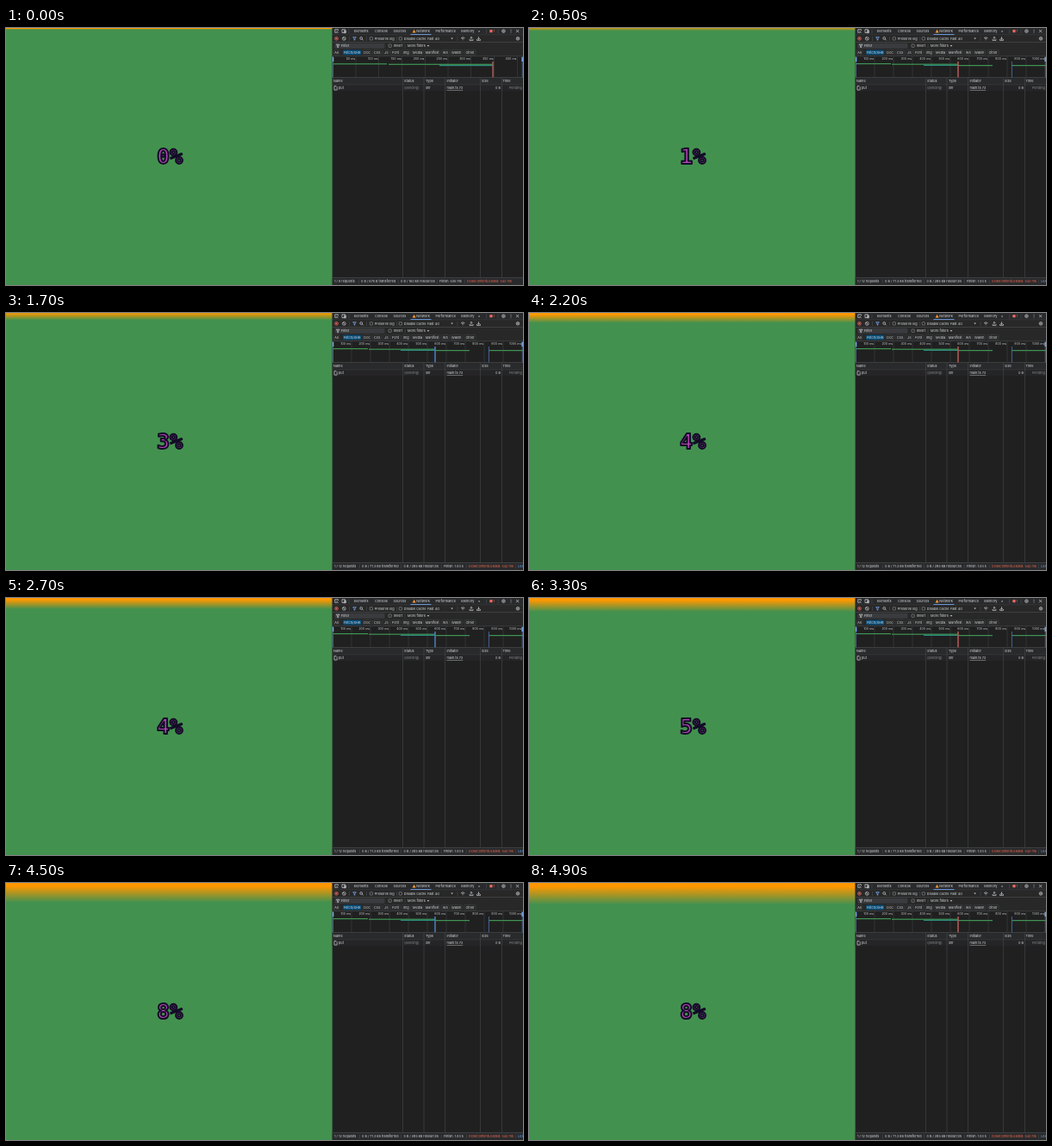
These frames come from a looping animation (600 by 299 pixels, 5 s). An HTML page:

```html
<!DOCTYPE html>
<html lang="en">
<head>
<meta charset="utf-8">
<title>Upload progress</title>
<style>
  html, body { margin: 0; width: 100%; height: 100%; overflow: hidden; background: #202020; }
  svg { display: block; width: 100vw; height: 100vh; }
  .ui { font: 3.85px Inter, Roboto, sans-serif; fill: #d6d8da; }
  .dim { fill: #85888b; }
  .strong { font-weight: 600; }
  .end { text-anchor: end; }
  .mid { text-anchor: middle; }
  .tick { font-size: 3.6px; fill: #c0c2c4; }
  .foot { font-size: 3.75px; }
  .alert { fill: #ef6a50; }
  .load { fill: #6ea8f5; }
  .link { text-decoration: underline; }
  .icon { fill: none; stroke: #c4c6c8; stroke-width: .75; }
  #percent {
    font: bold 25px "DejaVu Sans Mono", monospace; text-anchor: middle;
    fill: #b546b4; stroke: #120c26; stroke-width: 2; stroke-linejoin: round;
  }
</style>
</head>
<body>
<svg viewBox="0 0 600 299" preserveAspectRatio="none">
  <defs>
    <linearGradient id="fade" x2="0" y2="1">
      <stop offset=".15" stop-color="#ff9800"/>
      <stop offset="1" stop-color="#ff9800" stop-opacity="0"/>
    </linearGradient>
    <clipPath id="panelClip"><rect x="378.5" width="221.5" height="299"/></clipPath>
  </defs>
  <rect width="379" height="299" fill="#43914f"/>
  <rect id="glow" width="379" height="1"/>
  <text id="percent" x="190" y="158.4">0%</text>
  <g clip-path="url(#panelClip)">
    <g id="panel"></g>
    <g id="early"></g>
    <g id="late"></g>
  </g>
</svg>
<script>
const LOOP = 5000, FRAME = 100, EASE_TIME = 600, SWITCH = 300;
const updates = [
  [0, 1.08], [800, 2.17], [1500, 3.25], [2000, 4.33],
  [2800, 5.42], [3400, 6.52], [4000, 7.6], [4600, 8.67]
];

const byId = id => document.getElementById(id);
const rect = (x, y, w, h, fill, extra = '') =>
  `<rect x="${x}" y="${y}" width="${w}" height="${h}" fill="${fill}" ${extra}/>`;
const text = (x, y, label, cls = '') => `<text class="ui ${cls}" x="${x}" y="${y}">${label}</text>`;
const icon = (d, color = '#c4c6c8') => `<path class="icon" d="${d}" style="stroke:${color}"/>`;
const ring = (x, y, r, color = '#c4c6c8') =>
  `<circle class="icon" cx="${x}" cy="${y}" r="${r}" style="stroke:${color}"/>`;
const box = (x, y) => rect(x, y, 3.3, 3.3, 'none', 'rx=".5" stroke="#a4a6a8" stroke-width=".5"');
const vline = (x, y, h, color = '#4b4d50', w = .6) => rect(x - w / 2, y, w, h, color);
const hline = y => rect(378.5, y, 221.5, .6, '#4b4d50');
const gear = (x, y) => ring(x, y, 1.8) + ring(x, y, .6);
const arrow = (x, y) => `<path d="M${x - 1.3} ${y - .7}h2.6l-1.3 1.6z" fill="#c4c6c8"/>`;
const funnel = (x, y, color) => icon(`M${x - 1.8} ${y - 1.6}h3.6l-1.4 1.8v1.6h-.8v-1.6z`, color);

function drawTabs() {
  const tabs = [[404, 'Elements'], [428, 'Console'], [449.5, 'Sources'],
    [476.3, 'Network'], [498.5, 'Performance'], [528.3, 'Memory']];
  return rect(378.5, 0, 221.5, 8, '#292a2c') + hline(7.8)
    + icon('M384.5 5.3h-2.7v-3.6h3.6v1.6M383.6 3.5l2 2')
    + icon('M390 1.7h3.6v3.8h-3.6zM392.5 3h2v2.7h-2z') + vline(398, 1.5, 5)
    + tabs.map(([x, label]) => text(x, 5.2, label)).join('')
    + '<path d="M473.6 1.8l2 3.6h-4z" fill="#f29a35"/>'
    + rect(469.5, 7.2, 24, .9, '#7cacf8')
    + text(548, 5.1, '»') + vline(557.5, 1.5, 5)
    + rect(561.3, 2, 3.3, 3.3, '#e46962', 'rx=".6"') + text(565.6, 5.1, '1', 'alert')
    + vline(571, 1.5, 5) + gear(577.4, 3.6)
    + [2, 3.6, 5.2].map(y => rect(585.6, y - .4, .8, .8, '#c4c6c8')).join('')
    + icon('M592 2l3.2 3.2M595.2 2l-3.2 3.2');
}

function drawToolbar() {
  return rect(378.5, 8.4, 221.5, 24, '#282828')
    + ring(383.5, 12.3, 1.9, '#e46962') + rect(382.6, 11.4, 1.8, 1.8, '#e46962')
    + ring(392.3, 12.3, 1.9) + icon('M391 11l2.6 2.6') + vline(398.5, 10, 5)
    + funnel(404.5, 12.3, '#7cacf8') + ring(412.2, 11.9, 1.4) + icon('M413.3 13l1.4 1.4')
    + vline(418.5, 10, 5) + box(422.2, 10.7) + text(427.8, 13.7, 'Preserve log')
    + vline(453.8, 10, 5) + box(456.2, 10.7) + text(461.8, 13.7, 'Disable cache')
    + text(489, 13.7, 'Fast 4G') + arrow(517.6, 12.3) + vline(524, 10, 5)
    + icon('M528 11.7q2.2-1.9 4.4 0M529 12.9q1.2-1 2.4 0M530.2 13.8v.5')
    + icon('M540 13.5v-3.2l-1.3 1.3M540 10.3l1.3 1.3M538 13v1.4h4v-1.4')
    + icon('M548.5 10.2v3.2l-1.3-1.3M548.5 13.4l1.3-1.3M546.5 13v1.4h4v-1.4')
    + gear(594, 12.3) + hline(16)
    + rect(381.5, 17.7, 58, 6, '#3a3b3e', 'rx="1"') + funnel(385.2, 20.8)
    + text(389, 22.1, 'Filter') + box(444, 19) + text(449.8, 22.1, 'Invert')
    + vline(463, 18.5, 5) + text(466, 22.1, 'More filters') + arrow(490, 20.8);
}

function drawChips() {
  const chips = [[383.6, 'All', 6.6], [401.7, 'Fetch/XHR', 21], [419, 'Doc', 10],
    [430.7, 'CSS', 10], [441.3, 'JS', 8], [452, 'Font', 11.2], [464.3, 'Img', 9.5],
    [477.5, 'Media', 13.5], [494.6, 'Manifest', 18], [509.8, 'WS', 9],
    [522.7, 'Wasm', 13.8], [538.5, 'Other', 13.5]];
  return chips.map(([x, label, w], i) =>
    rect(x - w / 2, 25.4, w, 5.8, i === 1 ? '#064b77' : 'none',
      i === 1 ? 'rx="1.2"' : 'rx="1.2" stroke="#4b4d50" stroke-width=".4"')
    + text(x, 29.6, label, 'mid')).join('');
}

function drawTable() {
  const columns = [460.5, 485, 509.7, 550.5, 575.3];
  return rect(378.5, 57.5, 221.5, 8.6, '#292a2c') + hline(57.4) + hline(65.8)
    + rect(378.5, 66.4, 221.5, 7, '#252527')
    + columns.map(x => vline(x, 58, 232, '#47494c')).join('')
    + [[380, 'Name'], [462, 'Status'], [487, 'Type'], [511.5, 'Initiator'], [552, 'Size']]
      .map(([x, label]) => text(x, 63.3, label)).join('')
    + text(585.5, 63.3, 'Time', 'end')
    + icon('M381 67.6h2.2l1 1v3.5h-3.2z') + text(386, 71.1, 'put')
    + text(462, 71.1, '(pending)', 'dim') + text(487, 71.1, 'xhr')
    + text(511.5, 71.1, 'main.ts:73', 'link') + text(574, 71.1, '0 B', 'end')
    + text(598.8, 71.1, 'Pending', 'end dim')
    + rect(378.5, 290, 221.5, 9, '#292a2c') + hline(290);
}

// Overview strip and footer: tick labels, request bars [x, y, width, color], event lines.
function drawOverview({ first, gap, step, count, bars, marks, footer }) {
  let out = '';
  for (let i = 0; i < count; i++) {
    const x = first + i * gap;
    out += vline(x, 33, 24.4, '#424447', .5) + text(x - .8, 37.2, `${(i + 1) * step} ms`, 'tick end');
  }
  out += bars.map(([x, y, w, color]) => rect(x, y, w, 1.2, color)).join('');
  out += marks.map(([x, color]) => vline(x, 39, 18.4, color, .8)).join('');
  out += [379.6, 599.2].map(x => vline(x, 33, 24.4, '#56759f', .8)
    + rect(x - .7, 34, 1.4, 5, '#7cacf8')).join('');
  return out + footer.map(([x, label, cls = '']) => text(x, 296.4, label, 'foot ' + cls)).join('')
    + footer.slice(1).map(([x]) => vline(x - 2.8, 292.5, 4.5)).join('');
}

const GREEN = '#3f9455', TEAL = '#2c8c7d';
byId('panel').innerHTML = rect(378.5, 0, 221.5, 299, '#202020')
  + drawTabs() + drawToolbar() + drawChips() + hline(32.5) + drawTable()
  + vline(378.8, 0, 299, '#3d3f42');

byId('early').innerHTML = drawOverview({
  first: 406, gap: 26.75, step: 50, count: 8,
  bars: [[380, 41.2, 62, GREEN], [444, 41.7, 121, GREEN], [503, 43, 62, TEAL]],
  marks: [[564.7, '#b9564a'], [565.5, '#4d78b8']],
  footer: [[381, '1 / 9 requests'], [412, '0 B / 675 B transferred'],
    [458, '0 B / 192 kB resources'], [503, 'Finish: 535 ms'],
    [535, 'DOMContentLoaded: 542 ms', 'alert']]
});

byId('late').innerHTML = drawOverview({
  first: 401, gap: 22, step: 100, count: 9,
  bars: [[380, 41, 40, GREEN], [421, 41.6, 77, GREEN], [458, 42.8, 40, TEAL],
    [498, 43, 40, GREEN], [560.5, 43, 39.5, GREEN]],
  marks: [[497.6, '#4d78b8'], [498.4, '#b9564a'], [560.3, '#4d78b8']],
  footer: [[381, '1 / 12 requests'], [413, '0 B / 71.3 kB transferred'],
    [461.5, '0 B / 285 kB resources'], [508, 'Finish: 1.00 s'],
    [537, 'DOMContentLoaded: 542 ms', 'alert'], [594, 'Load: 1.00 s', 'load']]
}) + text(598.3, 37.2, '1000 ms', 'tick end');

function progressAt(time) {
  let value = 0;
  for (const [start, goal] of updates) {
    const u = Math.max(0, Math.min(1, (time - start) / EASE_TIME));
    value += (goal - value) * (1 - (1 - u) ** 2);
  }
  return value;
}

function render(now) {
  const time = Math.floor((now % LOOP) / FRAME) * FRAME;
  const progress = progressAt(time);
  const glow = byId('glow');
  byId('percent').textContent = Math.round(progress) + '%';
  glow.setAttribute('height', progress ? progress * 2.99 : 1.2);
  glow.setAttribute('fill', progress ? 'url(#fade)' : '#ff9800');
  glow.setAttribute('opacity', progress ? Math.min(1, .5 + .13 * progress) : 1);
  byId('early').style.display = time < SWITCH ? '' : 'none';
  byId('late').style.display = time < SWITCH ? 'none' : '';
}

const began = performance.now();
function tick() {
  render(performance.now() - began);
  requestAnimationFrame(tick);
}
tick();
</script>
</body>
</html>
```
